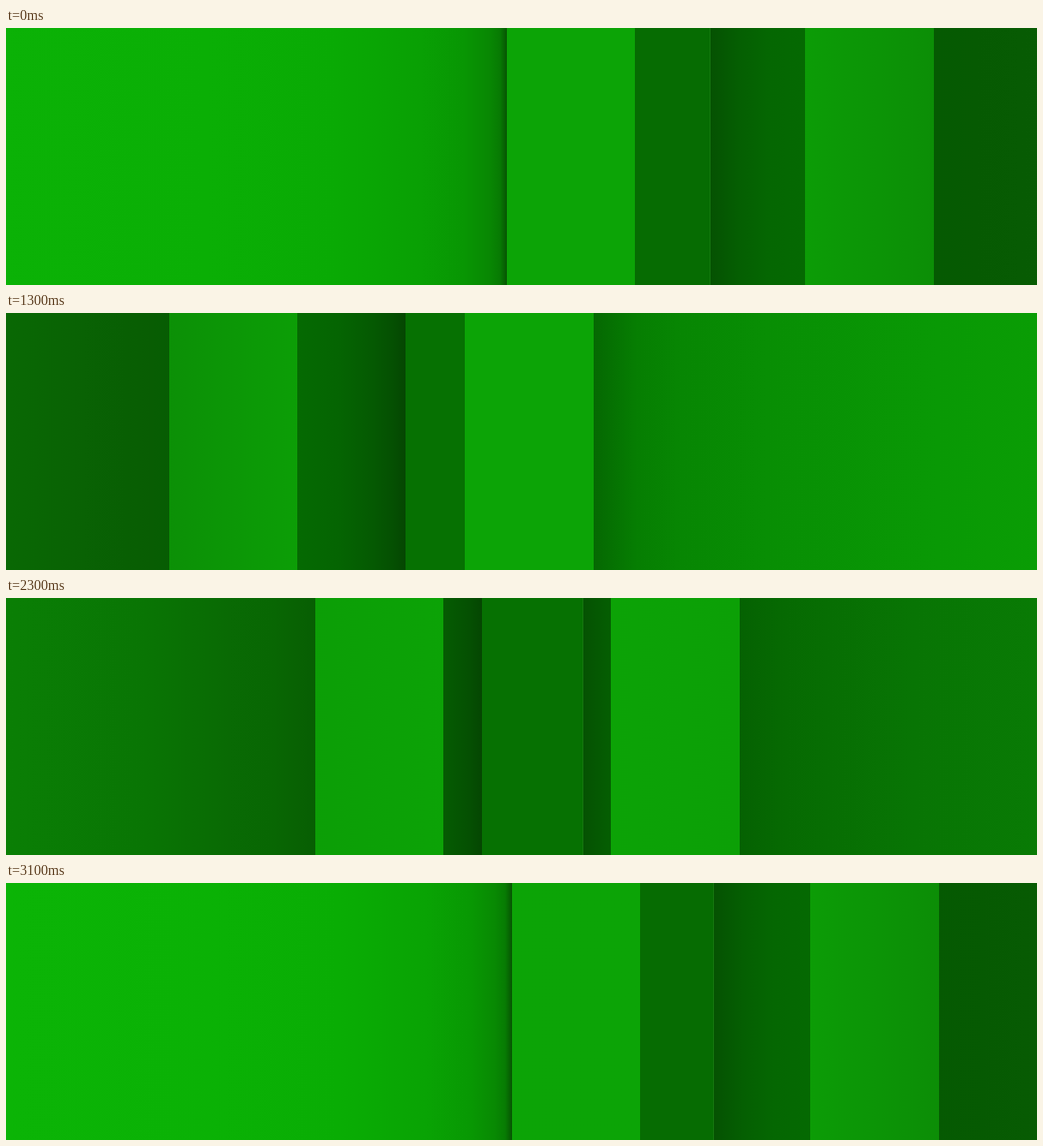
An HTML page without scripts for the animation above (3200 ms loop, 1200 by 300 pixels).

```html
<!DOCTYPE html>
<html lang="en">
<head>
<meta charset="utf-8">
<title>Green corridor</title>
<style>
/* --a: left edge of the near left pillar in px; everything else follows from it */
@property --a { syntax: "<number>"; inherits: true; initial-value: 583; }

html, body { margin: 0; width: 100%; height: 100%; overflow: hidden; background: rgb(5 90 2); }

.stage {
  position: relative; width: 1200px; height: 300px; overflow: hidden;
  animation: sway 3200ms infinite;
}
.stage div {
  --k: calc((var(--a) - 190) / 393);
  --k2: calc(var(--k) * var(--k));
  --k4: calc(var(--k2) * var(--k2));
  --j: calc(1 - var(--k));
  --j2: calc(var(--j) * var(--j));
  --near: calc(var(--a) + 344 + 2.5 * var(--k4));
  --far-left: calc(366 + .523 * var(--a));
  --far-right: calc(431.5 + .665 * var(--a));
  position: absolute; top: 0; height: 300px;
  left: calc(var(--x) * 1px); width: var(--w);
}

/* The picture advances every 100 ms, so each leg has one step per 100 ms */
@keyframes sway {
  0%      { --a: 583; animation-timing-function: steps(4); }
  12.5%   { --a: 461; animation-timing-function: steps(2); }
  18.75%  { --a: 399; animation-timing-function: steps(3); }
  28.125% { --a: 300; animation-timing-function: steps(3); }
  37.5%   { --a: 220; animation-timing-function: steps(1); }
  40.625% { --a: 190; animation-timing-function: steps(2); }
  46.875% { --a: 128; animation-timing-function: steps(1); }
  50%     { --a: 141; animation-timing-function: steps(2); }
  56.25%  { --a: 202; animation-timing-function: steps(2); }
  62.5%   { --a: 263; animation-timing-function: steps(4); }
  75%     { --a: 392; animation-timing-function: steps(1); }
  78.125% { --a: 424; animation-timing-function: steps(5); }
  93.75%  { --a: 564; animation-timing-function: steps(1); }
  96.875% { --a: 589; animation-timing-function: steps(1); }
  100%    { --a: 583; }
}

.stage .recess-left {
  --x: calc(var(--far-left) - 400); --w: 400px;
  background: linear-gradient(to left, rgb(5 70 2), rgb(5 80 2) 15px, rgb(5 90 2) 40px,
    rgb(5 100 2) 75px, rgb(5 106 2) 127px);
}
.stage .back {
  --x: var(--far-left); --w: 400px;
  background: rgb(6 calc(113 - 5 * var(--k4)) 2);
}
.stage .recess-right {
  --x: var(--far-right); --w: 400px;
  background: linear-gradient(to right, rgb(22 120 16) 1px, rgb(5 82 2) 1px, rgb(5 95 2) 35px,
    rgb(5 103 2) 70px, rgb(5 105 2) 110px);
}
.stage .pillar-left {
  --x: var(--a); --w: 149px;
  background: linear-gradient(to right,
    rgb(12 calc(144 + 44 * var(--k) - 24 * var(--k2)) 6),
    rgb(12 calc(158 + 14 * var(--k) - 8 * var(--k2)) 6));
}
.stage .pillar-right {
  --x: var(--near); --w: 151px;
  background: linear-gradient(to right,
    rgb(12 calc(156 + 16 * var(--j) - 8 * var(--j2)) 6),
    rgb(12 calc(142 + 44 * var(--j) - 22 * var(--j2)) 6));
}
.stage .wall-left {
  --x: calc(var(--a) - 700); --w: 700px;
  background: linear-gradient(to left,
    rgb(7 calc(92 + 6 * var(--k) - 13 * var(--k4)) 3),
    rgb(7 calc(93 + 4 * var(--k) + 25 * var(--k4)) 3) 8px,
    rgb(8 calc(93 + 8 * var(--k) + 34 * var(--k4)) 3) 20px,
    rgb(8 calc(95 + 15 * var(--k) + 40 * var(--k4)) 3) 50px,
    rgb(9 calc(98 + 15 * var(--k) + 47 * var(--k4)) 4) 100px,
    rgb(9 calc(105 + 25 * var(--k) + 40 * var(--k4)) 4) 200px,
    rgb(10 calc(112 + 30 * var(--k) + 33 * var(--k4)) 5) 350px,
    rgb(11 calc(115 + 35 * var(--k) + 28 * var(--k4)) 6) 600px);
}
.stage .wall-right {
  --x: calc(var(--near) + 150); --w: 1000px;
  background: linear-gradient(to right,
    rgb(5 calc(90 + 14 * var(--j)) 2),
    rgb(6 calc(90 + 16 * var(--j) + 20 * var(--j2)) 2) 50px,
    rgb(7 calc(91 + 20 * var(--j) + 23 * var(--j2)) 3) 100px,
    rgb(8 calc(92 + 35 * var(--j) + 15 * var(--j2)) 4) 200px,
    rgb(9 calc(95 + 45 * var(--j) + 13 * var(--j2)) 5) 400px,
    rgb(10 calc(96 + 48 * var(--j) + 14 * var(--j2)) 5) 550px);
}
</style>
</head>
<body>
<div class="stage">
  <div class="recess-left"></div>
  <div class="back"></div>
  <div class="recess-right"></div>
  <div class="wall-left"></div>
  <div class="pillar-left"></div>
  <div class="pillar-right"></div>
  <div class="wall-right"></div>
</div>
</body>
</html>
```
